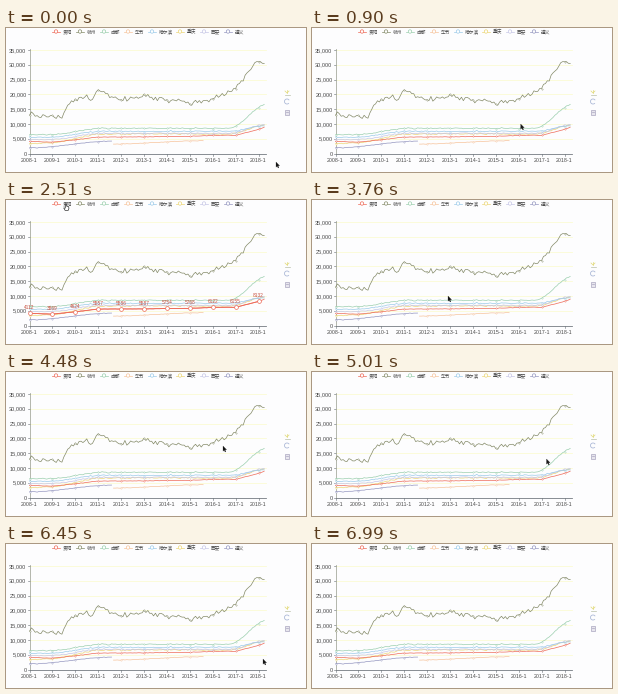
A matplotlib script for the animation above (7170 ms loop, 300 by 144 pixels).

```python
import numpy as np
import matplotlib.pyplot as plt
from matplotlib.animation import FuncAnimation
from matplotlib.patches import Arc, Circle, FancyBboxPatch, Polygon, Rectangle

W, H, DPI = 300, 144, 100
PX = 72 / DPI                  # points per pixel
LOOP, TICK, STEPS = 7170, 30, 40
LEFT, RIGHT, BASE = 23.5, 260, 125.5
YEAR, UNIT = 22.9, 14.8 / 5000
FONTS = ["Liberation Sans", "Noto Sans CJK JP"]
INK, AXIS, GRID = "#4a4a4a", "#6d747b", "#fbfbd2"
RED = "#ee6a58"

fig = plt.figure(figsize=(W / DPI, H / DPI), dpi=DPI, facecolor="#fdfdfe")
ax = fig.add_axes([0, 0, 1, 1])
ax.set_xlim(0, W)
ax.set_ylim(H, 0)
ax.axis("off")
rng = np.random.default_rng(8)


def text(x, y, s, size=5.3, color=INK, ha="center", z=4):
    return ax.text(x, y, s, fontsize=size * PX, color=color, ha=ha,
                   va="center_baseline", family=FONTS, zorder=z)


def line(xs, ys, color, width=0.7, z=2, **kw):
    return ax.plot(xs, ys, color=color, lw=width * PX, zorder=z, **kw)[0]


def px(year):
    return LEFT + YEAR * np.asarray(year)


def py(value):
    return BASE - UNIT * np.asarray(value)


# Axes
for k in range(8):
    y = py(5000 * k)
    if k:
        line([LEFT, RIGHT], [y, y], GRID, 0.8, 1)
    line([LEFT - 2, LEFT], [y, y], AXIS, 0.6)
    text(20.5, y, f"{5000 * k:,}", 5.7, ha="right")
for k in range(11):
    line([px(k)] * 2, [BASE, BASE + 2], AXIS, 0.6)
    text(px(k), 131.5, f"{2008 + k}-1", 5.2)
line([LEFT, LEFT], [21, BASE], "#a3a79a", 0.8)
line([LEFT, RIGHT], [BASE, BASE], AXIS, 0.8)

# Legend
COLOR = {"贵阳": RED, "杭州": "#848a68", "成都": "#9bcfae", "毕节": "#f6c39b",
         "哈尔滨": "#9ccbea", "重庆": "#ecd676", "西安": "#c6c6e6",
         "遵义": "#9496c0"}
x = 50
for name, color in COLOR.items():
    line([x - 4, x + 4], [3.5, 3.5], color)
    ax.add_patch(Circle((x, 3.5), 1.7, fc="white", ec=color,
                        lw=0.7 * PX, zorder=3))
    text(x + 7, 3.5, name, 4.7, ha="left")
    x += 16 + 4 * len(name)


# Price curves
def ease(t, start, span):
    u = np.clip((t - start) / span, 0, 1)
    return u * u * (3 - 2 * u)


def growth(t, first, middle, last):
    """Early climb, long plateau, late climb."""
    return (first + (middle - first) * ease(t, 0.8, 2.4)
            + (last - middle) * ease(t, 8.7, 1.7))


def curve(name, t, values, noise):
    color = COLOR[name]
    values = values + rng.normal(0, noise, len(t))
    line(px(t), py(values), color)
    yearly = t % 1 < 0.01
    line(px(t[yearly]), py(values[yearly]), color, ls="", marker="o",
         ms=1.3 * PX, mfc="white", mew=0.4 * PX)


GUIYANG = [4112, 3869, 4624, 5557, 5586, 5587, 5754, 5768, 6122, 6155, 8132]
t = np.arange(124) / 12
for name, first, middle, last in [("重庆", 3500, 6600, 9700),
                                  ("西安", 4700, 6800, 9900),
                                  ("哈尔滨", 5500, 7500, 9500),
                                  ("成都", 6300, 8500, 16700)]:
    curve(name, t, growth(t, first, middle, last), 100)
for name, start, end, low, high in [("毕节", 3.6, 7.6, 3200, 4300),
                                    ("遵义", 0, 3.6, 1900, 4200)]:
    part = t[(t >= start) & (t <= end)]
    curve(name, part, low + (high - low) * ease(part, start, end - start), 50)
curve("贵阳", t, np.interp(t, [*range(11), 10.3], GUIYANG + [9100]), 40)
curve("杭州", t, np.interp(
    t, [0, 1.4, 1.8, 2.4, 2.75, 3, 4, 5, 7, 8, 8.9, 9.7, 10, 10.3],
    np.array([12.9, 12.5, 17.6, 19.4, 18.4, 21.6, 17.7, 19.2, 17.4, 18.2,
              21.6, 29, 31.3, 30]) * 1000), 420)

# Toolbox
line([281, 281], [61.5, 64.5], "#e2da78")
line([279, 281, 283], [63, 65, 63], "#e2da78")
line([278.5, 283.5], [66.5, 66.5], "#b8bfa8")
ax.add_patch(Arc((281, 73.5), 5, 5, theta1=40, theta2=330, ec="#a9b7d6",
                 lw=0.8 * PX))
ax.add_patch(Rectangle((279, 81.5), 4, 5, fc="#e8e6ee", ec="#aaa6c0",
                       lw=0.7 * PX))
line([280, 282], [84, 84], "#aaa6c0")


def spot(year, value):
    dot = line([px(year)], [py(value)], RED, z=5, ls="", marker="o",
               ms=3.8 * PX, mfc="white", mec=RED, mew=0.7 * PX)
    tag = text(px(year), py(value) - 6.3, str(value), 4.8, "#c8503f", z=6)
    return [dot, tag]


# Emphasised series
series = [line(px(range(11)), py(GUIYANG), RED, 0.9, 4)]
for k, value in enumerate(GUIYANG):
    series += spot(k, value)

# Tooltip over the last yearly point
tip = spot(10, GUIYANG[-1])
tip.append(ax.add_patch(FancyBboxPatch(
    (181.5, 100.5), 46, 18, boxstyle="round,pad=0,rounding_size=1.2",
    fc="#323232", ec="none", alpha=0.75, zorder=7)))
tip.append(text(184, 105.5, "贵阳", 5.5, "white", "left", 8))
tip.append(ax.add_patch(Circle((186, 113.5), 1.6, fc=RED, ec="none", zorder=8)))
tip.append(text(189.5, 113.5, f"2018-1: {GUIYANG[-1]:,}", 5.6, "white", "left", 8))

# Pointers, both with the tip at the origin
ARROW = np.array([(0, 0), (0, 5.2), (1.2, 4.1), (2.1, 6), (2.9, 5.7),
                  (2.1, 3.8), (3.6, 3.7)])
HAND = np.array([(-0.6, 0), (0.6, 0), (0.7, 2.2), (2.7, 2.7), (2.9, 4.6),
                 (2.2, 6.4), (-0.9, 6.4), (-2.3, 3.9), (-0.7, 4.1)])
arrow = ax.add_patch(Polygon(ARROW, fc="#151515", ec="#151515",
                             lw=0.2 * PX, zorder=10))
hand = ax.add_patch(Polygon(HAND, fc="white", ec="#333333",
                            lw=0.7 * PX, zorder=10))

# Pointer stops: step, x, y
STOPS = np.array([(0, 270, 134), (2, 247, 112), (3, 247, 112), (9, 132, 64),
                  (13, 60, 4), (20, 60, 4), (21, 136, 96), (25, 217, 74),
                  (31, 252, 100), (35, 252, 100), (39, 272, 160)])


def show(artists, on):
    for a in artists:
        a.set_visible(on)


def draw(n):
    step = min(int((n * TICK + 25) * STEPS / LOOP), STEPS - 1)
    pos = [np.interp(step, STOPS[:, 0], STOPS[:, c]) for c in (1, 2)]
    on_legend = 13 <= step <= 20
    on_point = 31 <= step <= 35
    show(series, on_legend)
    show(tip, on_point)
    show([hand], on_legend or on_point)
    show([arrow], not (on_legend or on_point))
    arrow.set_xy(ARROW + pos)
    hand.set_xy(HAND + pos)
    return [*series, *tip, arrow, hand]


anim = FuncAnimation(fig, draw, frames=LOOP // TICK, interval=TICK,
                     repeat=True, repeat_delay=0, blit=False)
plt.show()
```
